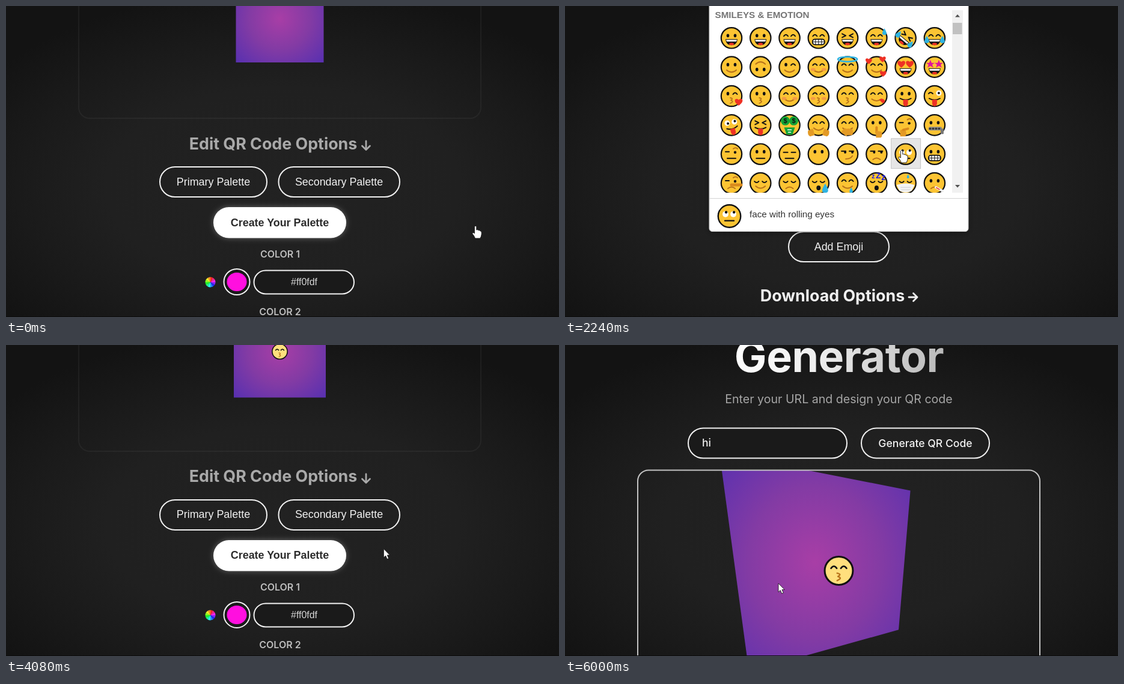
These frames come from a looping animation (920x518 px, 6.08 s). An HTML page:

```html
<!DOCTYPE html>
<html lang="en">
<head>
<meta charset="utf-8">
<title>Code designer</title>
<style>
  html, body { margin: 0; width: 100%; height: 100%; overflow: hidden; background: #1f1f1f; }
  svg { display: block; width: 920px; height: 518px; }
  .ui { font-family: "Liberation Sans", Arial, sans-serif; }
  .head { font-family: Inter, sans-serif; }
  .mid { text-anchor: middle; }
</style>
</head>
<body>
<svg id="stage" viewBox="0 0 920 518" xmlns="http://www.w3.org/2000/svg"></svg>
<script>
const LOOP = 6080, STEP = 80;
const INK = '#111', BROWN = '#b9741c', BLUE = '#2fb4e2', RED = '#ee3124';

// ---------- drawing helpers ----------
const line = (d, c = INK, w = 2) =>
  `<path d="${d}" fill="none" stroke="${c}" stroke-width="${w}" stroke-linecap="round" stroke-linejoin="round"/>`;
const fill = (d, c) => `<path d="${d}" fill="${c}"/>`;
const oval = (x, y, rx, ry = rx, c = INK) => `<ellipse cx="${x}" cy="${y}" rx="${rx}" ry="${ry}" fill="${c}"/>`;
const box = (x, y, w, h, r, attrs) => `<rect x="${x}" y="${y}" width="${w}" height="${h}" rx="${r}" ${attrs}/>`;
const move = (x, y, s, more = '') => `<g transform="translate(${x} ${y}) ${more}">${s}</g>`;
const both = s => s + `<g transform="scale(-1 1)">${s}</g>`;
const text = (x, y, size, str, c, cls, weight = 400, more = '') =>
  `<text x="${x}" y="${y}" font-size="${size}" fill="${c}" class="${cls}" font-weight="${weight}" ${more}>${str}</text>`;
const pill = (x, y, w, h, f = 'none', more = '') =>
  box(x, y, w, h, h / 2, `fill="${f}" stroke="#f2f2f2" stroke-width="2" ${more}`);

// ---------- emoji ----------
const heart = (x, y, k = 1) => move(x, y, fill('M0 5C-9-1-5-7 0-3C5-7 9-1 0 5z', RED), `scale(${k})`);
const drop = (x, y, k = 1) => move(x, y, fill('M0-6Q7 5 0 5Q-7 5 0-6z', BLUE), `scale(${k})`);
const star = (x, y) => move(x, y, fill('M0-7L2-2 7-2 3 1 5 6 0 3-5 6-3 1-7-2-2-2z', '#e0139c'));
const ball = (x, y, px, py) => oval(x, y, 4.5, 4.5, '#fff') + oval(x + px, y + py, 2);
const mouth = fill('M-10 2H10Q9 12 0 12Q-9 12-10 2z', INK);
const tongue = fill('M-4 6H4V13Q3 17 0 17Q-3 17-4 13z', RED);
const hand = (x, y, a) => move(x, y, fill('M-4 7V-2Q-4-5-1-4L5-3Q8 4 4 7z', '#e39a25'), `rotate(${a})`);
const arcEye = line('M2.5-3q3.5-5 7 0');
const PARTS = {
  dot: both(oval(6, -4, 2.3, 2.9)),
  arc: both(arcEye),
  shut: both(line('M3-3q3.5 4 7 0')),
  squint: both(line('M9-7l-6 3 6 3')),
  bar: both(line('M3-3h7')),
  wink: oval(-6, -4, 2.3, 2.9) + arcEye,
  loves: heart(-7, -5, 1.2) + heart(7, -5, 1.2),
  stars: star(-7, -5) + star(7, -5),
  cash: both(oval(7, -7, 7.5, 7.5, '#12a336')) + text(-7, -3, 11, '$', INK, 'ui mid', 700) + text(7, -3, 11, '$', INK, 'ui mid', 700),
  zany: ball(-6, -5, 1, 1) + ball(6, -4, 1, -1),
  peek: line('M-10-4q3-4 7 0') + ball(7, -5, 0, 0),
  up: ball(-6, -3, 1, -3) + ball(6, -3, 1, -3),
  side: both(line('M3-5h7')) + oval(-4, -3, 2) + oval(8, -3, 2),
  brow: line('M-10-4h6') + oval(6, -3, 2.2) + line('M3-9q4-3 7 0', BROWN),
  grin: mouth + fill('M-9 3H9L8 6H-8z', '#fff') + oval(0, 10, 4, 2, RED),
  teeth: box(-10, 2, 20, 9, 4, `fill="#fff" stroke="${INK}" stroke-width="1.8"`) + line('M-10 6.5H10M-5 2v9M0 2v9M5 2v9', INK, 1),
  smile: line('M-8 5Q0 12 8 5', BROWN),
  flat: line('M-7 7H7'),
  kiss: line('M-2 3q6 1 1 4q6 2-1 5', BROWN, 1.8),
  smirk: line('M-3 8Q5 8 8 3', BROWN),
  sad: line('M-6 9Q0 4 6 9', BROWN),
  open: oval(0, 8, 3.5, 4),
  lick: line('M-9 4Q0 9 9 4', INK) + tongue,
  yum: line('M-8 5Q0 11 8 5', BROWN) + move(8, 5, fill('M-4 0Q4-2 5 4Q4 9 0 6z', RED), 'rotate(-10)'),
  bill: fill('M-9 4H9L5 16H-5z', '#12a336') + line('M-3 8H3M-2 12H2', '#fff', 1.5),
  blush: both(oval(9, 4, 4, 2.5, '#f49a45')),
  sweat: drop(13, -10),
  tears: both(drop(13, 3, 1.1)),
  halo: `<ellipse cy="-13" rx="16" ry="4" fill="none" stroke="${BLUE}" stroke-width="2.5"/>`,
  hearts: heart(-13, -10) + heart(10, -13) + heart(11, 11),
  love: heart(12, 10, 1.2),
  hug: both(hand(12, 11, 15)),
  palm: hand(3, 10, 0) + hand(-5, 11, -50),
  hush: line('M0 4V13', '#d98a1c', 4) + hand(3, 14, 0),
  think: hand(-5, 12, 0) + line('M-4 8L4 6', '#d98a1c', 4),
  zip: box(-10, 3, 22, 6, 2, 'fill="#888"') + line('M-8 6H10', '#333', 3).replace('/>', ' stroke-dasharray="1 4"/>') + box(10, 6, 5, 9, 1, 'fill="#777"'),
  nose: line('M0 3H16', '#d98a1c', 5),
  runny: drop(11, 9, 1.4),
  drool: drop(6, 12, .8),
  zzz: text(-8, -8, 10, 'z', '#1717e8', 'ui', 700) + text(-1, -8, 13, 'Z', '#1717e8', 'ui', 700) + text(8, -5, 14, 'z', '#1717e8', 'ui', 700),
  mask: fill('M-15 3Q0-2 15 3L10 13Q0 18-10 13z', '#f4f4f4') + line('M-8 7H8M-7 11H7', '#ccc', 1) + drop(4, -11, .6),
  temp: line('M2 7L13 13', '#eee', 4) + line('M3 7.5L8 10.5', RED, 1.5)
};
const FACES = ('dot grin,dot grin,arc grin,arc teeth,squint grin,arc grin sweat,squint grin tears r40,arc grin tears,' +
  'dot smile,dot smile r180,wink smile,arc smile blush,arc smile halo,arc smile hearts,loves grin,stars grin,' +
  'wink kiss love,dot kiss,arc smile blush,arc kiss blush,arc kiss,arc yum,dot lick,peek lick,' +
  'zany lick r-15,squint lick,cash bill,arc smile hug,arc smile palm,dot hush,brow think,dot zip,' +
  'brow flat,dot flat,bar flat,dot,side smirk,side sad,up flat,dot teeth,' +
  'brow sad nose,shut smile,shut sad,shut open runny,arc smile drool,shut open zzz,shut mask,dot sad temp').split(',');
const NAMES = {
  47: 'face with thermometer', 38: 'face with rolling eyes', 29: 'shushing face',
  21: 'face savoring food', 20: 'kissing face with smiling eyes'
};
function face(spec, skin = '#fcc433') {
  let turn = 0, art = '';
  for (const p of spec.split(' ')) {
    if (PARTS[p]) art += PARTS[p];
    else turn = +p.slice(1);
  }
  return `<g transform="rotate(${turn})"><circle r="17.2" fill="${skin}" stroke="${INK}" stroke-width="2.2"/>${art}</g>`;
}
const cellX = i => 277 + 48.27 * (i % 8);
const cellY = i => 53.3 + 48.35 * Math.floor(i / 8);

// ---------- page ----------
function wheel(x, y) {
  let s = '';
  for (let i = 0; i < 12; i++)
    s += `<path d="M0 0V-8.5A8.5 8.5 0 0 1 4.5-7.2z" transform="rotate(${i * 30})" fill="hsl(${360 - i * 30} 90% 55%)"/>`;
  return move(x, y, s);
}
const colorRow = (y, label, hex) =>
  text(456, y, 16, label, '#bdbdbd', 'head mid', 600) + wheel(340, y + 41) +
  `<circle cx="384" cy="${y + 40.5}" r="21.5" fill="#1a1a1a" stroke="#f2f2f2" stroke-width="2"/>` +
  oval(384, y + 40.5, 16.5, 15.5, hex) +
  pill(412.5, y + 21.5, 166.5, 39, '#1a1a1a') + text(496, y + 46, 15.9, hex, '#d6d6d6', 'ui mid');

const page =
  text(456, 45, 71.6, 'Generator', 'url(#title)', 'head mid', 700, 'letter-spacing="-.4"') +
  text(455.5, 97, 19.6, 'Enter your URL and design your QR code', '#a6a6a6', 'head mid') +
  pill(205, 138.5, 264, 50, '#1a1a1a') + text(228, 169, 17.6, 'hi', '#eee', 'head', 500) +
  pill(493, 138.5, 213, 50) + text(599.5, 169.5, 17.6, 'Generate QR Code', '#f2f2f2', 'head mid', 500) +
  `<g clip-path="url(#cardClip)"><polygon id="panel" fill="url(#tones)"/><g id="badge">${face(FACES[20], '#ffdf7d')}</g></g>` +
  box(121, 208.5, 669, 333.5, 18, 'id="card" fill="none" stroke="#c4c4c4" stroke-width="2"') +
  text(444.5, 593.5, 26.8, 'Edit QR Code Options', '#a9a9a9', 'head mid', 700) +
  line('M599 580V594M592.5 588L599 594.5L605.5 588', '#a9a9a9', 2.8) +
  pill(256, 623, 178, 50) + text(345, 653.5, 17.9, 'Primary Palette', '#f2f2f2', 'ui mid') +
  pill(453.5, 623, 201.5, 50) + text(554, 653.5, 17.9, 'Secondary Palette', '#f2f2f2', 'ui mid') +
  box(345, 690, 221, 51.5, 25.7, 'fill="#fff" filter="url(#glow)"') +
  text(455.5, 721.5, 17.9, 'Create Your Palette', '#2b2b2b', 'ui mid', 700) +
  colorRow(774, 'COLOR 1', '#ff0fdf') + colorRow(870, 'COLOR 2', '#1100ff') + colorRow(966, 'BACKGROUND', '#0d0d0d') +
  box(372, 1047, 167, 50, 25, 'id="hover" fill="url(#shine)"') + pill(372, 1047, 167, 50) +
  text(455.5, 1077.5, 17.9, 'Add Emoji', '#f2f2f2', 'ui mid', 400, 'id="add"') +
  text(445, 1163, 26.8, 'Download Options', '#f0f0f0', 'head mid', 700) +
  line('M572 1156H586M579.5 1149.5L586 1156L579.5 1162.5', '#f0f0f0', 2.8);

const picker =
  box(240, -20, 431, 395.5, 5, 'fill="#fff" stroke="#c4c4c4" filter="url(#shade)"') +
  text(249.5, 19.5, 15.2, 'SMILEYS &amp; EMOTION', '#757575', 'ui', 700) +
  box(0, 0, 49, 50, 0, 'id="cell" fill="#e6e6e6" stroke="#999" stroke-dasharray="1 1"') +
  `<g clip-path="url(#gridClip)">${FACES.map((f, i) => move(cellX(i), cellY(i), face(f))).join('')}</g>` +
  box(644, 7, 18, 304, 0, 'fill="#f1f1f1"') + box(645, 28, 15.5, 19, 0, 'fill="#c1c1c1"') +
  fill('M649 18.5L653 14L657 18.5z', '#505050') + fill('M649 298L653 302.5L657 298z', '#505050') +
  '<path d="M240 320.5H671" stroke="#d4d4d4"/>' +
  '<g id="preview" transform="translate(273.5 350) scale(1.09)"></g>' +
  text(307, 352, 15.2, '', '#333', 'ui', 400, 'id="name"');

const cursors =
  '<g id="arrow" fill="#fff" stroke="#111" stroke-width=".8"><path d="M0 0V14.5L3.3 11.5L5.7 17L8.3 16L6 10.5H10.2z"/></g>' +
  '<g id="hand" fill="#fff" stroke="#111" stroke-width=".9"><path d="M-1.6 1.5Q0-1 1.8 1.5V7Q4 6 5 7.6Q7 7 8 8.8Q10 8.6 10.2 11V14Q10 17 8 21H-.5Q-2 17-5 13.5Q-5.5 10.5-3 11.5L-1.6 13z"/></g>';

const $ = id => document.getElementById(id);
$('stage').innerHTML = `<defs>
  <radialGradient id="back" gradientUnits="userSpace" cx=".5" cy=".58" r=".64">
    <stop offset="0" stop-color="#222"/><stop offset=".5" stop-color="#202020"/>
    <stop offset=".75" stop-color="#1a1a1a"/><stop offset="1" stop-color="#131313"/></radialGradient>
  <linearGradient id="title" gradientUnits="userSpaceOnUse" x1="282" y1="-10" x2="630" y2="50">
    <stop offset="0" stop-color="#fff"/><stop offset=".4" stop-color="#eee"/><stop offset="1" stop-color="#b8b8b8"/></linearGradient>
  <linearGradient id="shine"><stop offset="0" stop-color="#fff"/><stop offset="1" stop-color="#5c5c5c"/></linearGradient>
  <radialGradient id="tones" r=".7"><stop offset="0" stop-color="#a83ea6"/><stop offset=".5" stop-color="#833ba4"/>
    <stop offset="1" stop-color="#5830b0"/></radialGradient>
  <clipPath id="cardClip"><rect x="121" y="208" width="669" height="334" rx="18"/></clipPath>
  <clipPath id="gridClip"><rect x="240" y="0" width="404" height="311"/></clipPath>
  <filter id="glow" x="-20%" y="-60%" width="140%" height="220%"><feDropShadow dx="0" dy="0" stdDeviation="5" flood-color="#fff" flood-opacity=".3"/></filter>
  <filter id="shade"><feDropShadow dx="0" dy="2" stdDeviation="5" flood-opacity=".35"/></filter>
  </defs><rect width="920" height="518" fill="url(#back)"/>
  <g id="page">${page}</g><g id="picker">${picker}</g>
  <rect y="517" width="920" height="1" fill="#0c0c0c"/>${cursors}`;

// ---------- motion ----------
const ease = u => u * u * (3 - 2 * u);
// Each track is a list of [time, value, value...]
function at(track, t, curve = u => u) {
  let i = track.findIndex(k => k[0] > t);
  if (i === 0) return track[0].slice(1);
  if (i < 0) return track[track.length - 1].slice(1);
  const a = track[i - 1], b = track[i], u = curve((t - a[0]) / (b[0] - a[0]));
  return a.slice(1).map((v, n) => v + (b[n + 1] - v) * u);
}
const SCROLL = [[0, 355], [600, 671], [3760, 671], [4440, 0]];
const POINTER = [[0, 781, 366], [160, 760, 372], [600, 515, 405], [880, 473, 410], [1200, 462, 414], [1440, 468, 414],
  [1600, 550, 470], [1680, 585, 430], [1920, 612, 345], [2080, 600, 300], [2240, 560, 240], [2400, 520, 190],
  [2560, 478, 150], [2960, 467, 143], [3200, 467, 143], [3600, 640, 322], [3760, 654, 333], [4000, 650, 335],
  [4480, 520, 362], [4640, 499, 352], [5120, 475, 375], [5440, 540, 380], [5760, 530, 385], [6000, 355, 397]];
// half size, yaw and pitch in degrees
const TILT = [[0, 73, 0, 0], [3120, 73, 0, 0], [3200, 76.5, 0, 0], [4640, 76.5, 0, 0], [5120, 142, 0, 0],
  [5440, 142, -16, 6], [5760, 142, -15, 8], [6000, 142, 21, 10]];
const HOVER = [[520, 0], [640, 1], [1480, 1], [1760, 0]];

function project(x, y, [size, yaw, pitch]) {
  const a = yaw * Math.PI / 180, b = pitch * Math.PI / 180, far = size * 1.585;
  const z = -x * size * Math.sin(a);
  const k = far / (far - z * Math.cos(b) + y * size * Math.sin(b));
  return [455.5 + x * size * Math.cos(a) * k, 376 + (y * size * Math.cos(b) + z * Math.sin(b)) * k];
}
const show = (id, on) => $(id).setAttribute('display', on ? 'inline' : 'none');
const place = (id, x, y, more = '') => $(id).setAttribute('transform', `translate(${x} ${y}) ${more}`);

function draw(t) {
  const [scroll] = at(SCROLL, t, ease), [x, y] = at(POINTER, t), tilt = at(TILT, t, ease), [lit] = at(HOVER, t);
  place('page', 0, -scroll);
  $('card').setAttribute('opacity', Math.max(.06, 1 - scroll / 340));

  const corners = [[-1, -1], [1, -1], [1, 1], [-1, 1]].map(([px, py]) => project(px, py, tilt));
  $('panel').setAttribute('points', corners.join(' '));
  place('badge', ...project(0, 0, tilt), `scale(${tilt[0] * .0096})`);
  show('badge', t >= 3120);

  $('hover').setAttribute('opacity', lit);
  const tone = Math.round(242 - 200 * lit);
  $('add').setAttribute('fill', `rgb(${tone},${tone},${tone})`);

  const open = t >= 1440 && t < 3120;
  const col = Math.floor((x - 253) / 48.27), row = Math.floor((y - 29) / 48.35);
  const over = open && t >= 2000 && col < 8 && y < 311;
  const i = row * 8 + col;
  show('picker', open);
  show('cell', over);
  show('preview', over);
  $('name').textContent = over ? NAMES[i] || '' : '';
  if (over) {
    place('cell', cellX(i) - 24, cellY(i) - 26);
    $('preview').innerHTML = face(FACES[i]);
  }

  const pointing = t < 1520 || over;
  show('hand', pointing);
  show('arrow', !pointing);
  place(pointing ? 'hand' : 'arrow', x, y);
}

function tick() {
  const t = performance.now() % LOOP;
  draw(Math.floor(t / STEP) * STEP);
  requestAnimationFrame(tick);
}
tick();
</script>
</body>
</html>
```
